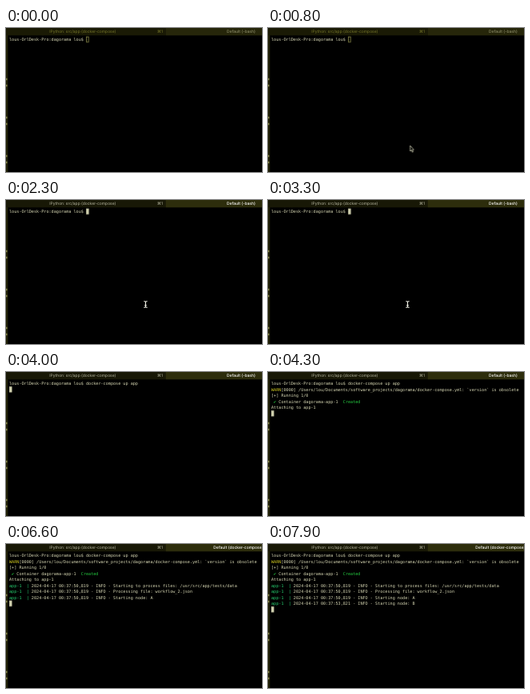
Animation of 320x180 px, one loop 8000 ms. Source, as an HTML page:

```html
<!DOCTYPE html>
<html lang="en">
<head>
<meta charset="utf-8">
<title>Terminal session</title>
<style>
  html, body { margin: 0; width: 100%; height: 100%; overflow: hidden; background: #000; }
  svg { display: block; width: 100vw; height: 100vh; }
  svg * { animation: 8s step-end infinite; }
  text { white-space: pre; text-rendering: geometricPrecision; }
  .term { font: 5.15px "DejaVu Sans Mono", monospace; fill: #d8d8b4; }
  .bar { font: 4.95px Inter, sans-serif; }
  .warn { fill: #d0c820; }
  .ok { fill: #24cc40; }
  .app { fill: #26cf70; }

  /* window gains focus at 2.3 s */
  .tab-idle { animation-name: tab-idle; }
  .tab-open { animation-name: tab-open; }
  .label-idle { animation-name: label-idle; }
  .label-open { animation-name: label-open; }
  .block { stroke-width: .7; animation-name: block; }
  @keyframes tab-idle { 0% { fill: #1a1a05 } 28.75%, 100% { fill: #181806 } }
  @keyframes tab-open { 0% { fill: #26260a } 28.75%, 100% { fill: #2d2d0c } }
  @keyframes label-idle { 0% { fill: #77772a } 28.75%, 100% { fill: #b8b8a2 } }
  @keyframes label-open { 0% { fill: #8a8a66 } 28.75%, 100% { fill: #fff } }
  @keyframes block { 0% { fill: #000; stroke: #a0a054 } 28.75%, 100% { fill: #d2d2b0; stroke: #d2d2b0 } }

  /* the tab is renamed once the command runs */
  .shell { animation-name: shell; }
  .running { animation-name: running; }
  @keyframes shell { 0% { opacity: 1 } 62.5%, 100% { opacity: 0 } }
  @keyframes running { 0% { opacity: 0 } 62.5%, 100% { opacity: 1 } }

  /* mouse pointer */
  .arrow { animation-name: arrow; }
  .beam { animation-name: beam; }
  @keyframes arrow {
    0%, 6.25% { transform: translate(184px, 182px); animation-timing-function: ease-out }
    14%, 28.7% { transform: translate(174.5px, 129.6px); opacity: 1 }
    28.75%, 100% { transform: translate(174.5px, 129.6px); opacity: 0 }
  }
  @keyframes beam { 0% { opacity: 0 } 28.75% { opacity: 1 } 43.25%, 100% { opacity: 0 } }

  /* typing, then the cursor drops below each new line */
  .cursor { animation-name: cursor; }
  @keyframes cursor {
    0% { transform: translate(100.1px, 10.7px) }
    43.25% { transform: translate(100.1px, 10.7px); animation-timing-function: steps(21) }
    49.8% { transform: translate(165.2px, 10.7px) }
    50% { transform: translate(4px, 18.2px) }
    51.2% { transform: translate(4px, 25.7px) }
    52.4% { transform: translate(4px, 40.7px) }
    53.6% { transform: translate(4px, 48.2px) }
    57.4% { transform: translate(4px, 70.7px) }
    94.9%, 100% { transform: translate(4px, 78.2px) }
  }
  .warning { animation-name: warning; }
  .status { animation-name: status; }
  .attach { animation-name: attach; }
  .log { animation-name: log; }
  .node { animation-name: node; }
  @keyframes warning { 0% { opacity: 0 } 51.2%, 100% { opacity: 1 } }
  @keyframes status { 0% { opacity: 0 } 52.4%, 100% { opacity: 1 } }
  @keyframes attach { 0% { opacity: 0 } 53.6%, 100% { opacity: 1 } }
  @keyframes log { 0% { opacity: 0 } 57.4%, 100% { opacity: 1 } }
  @keyframes node { 0% { opacity: 0 } 94.9%, 100% { opacity: 1 } }
</style>
</head>
<body>
<svg viewBox="0 0 320 180">
  <rect width="320" height="180"/>

  <!-- window behind, showing at the left edge -->
  <rect width="2.4" height="180" fill="#222208"/>
  <path d="M0 64h1.5M0 72h1.5M0 112h1.5M0 120h1.5M0 160h1.5M0 168h1.5" stroke="#85854a" stroke-width="2.4"/>

  <g class="bar">
    <rect class="tab-idle" width="199.5" height="9.3"/>
    <rect class="tab-open" x="199.5" width="120.5" height="9.3"/>
    <text class="label-idle" x="54.3" y="6.1">IPython: src/app (docker-compose)</text>
    <text class="label-idle" x="189" y="6.1">⌘1</text>
    <g font-weight="500">
      <g class="shell"><text class="label-open" x="276" y="6.1">Default (-bash)</text></g>
      <g class="running"><text class="label-open" x="259.3" y="6.1">Default (docker-compose)</text></g>
    </g>
  </g>

  <g class="term">
    <text x="4" y="16">lous-OrlDesk-Pro:dagorama lou$ docker-compose up app</text>
    <text class="warning" x="4" y="23.5"><tspan class="warn">WARN</tspan>[0000] /Users/lou/Documents/software_projects/dagorama/docker-compose.yml: `version` is obsolete</text>
    <g class="status">
      <text x="4" y="31">[+] Running 1/0</text>
      <text x="4" y="38.5"> <tspan class="ok">✔</tspan> Container dagorama-app-1  <tspan class="ok">Created</tspan></text>
    </g>
    <text class="attach" x="4" y="46">Attaching to app-1</text>
    <g class="log">
      <text x="4" y="53.5"><tspan class="app">app-1  |</tspan> 2024-04-17 00:37:50,819 - INFO - Starting to process files: /usr/src/app/tests/data</text>
      <text x="4" y="61"><tspan class="app">app-1  |</tspan> 2024-04-17 00:37:50,819 - INFO - Processing file: workflow_2.json</text>
      <text x="4" y="68.5"><tspan class="app">app-1  |</tspan> 2024-04-17 00:37:50,819 - INFO - Starting node: A</text>
    </g>
    <text class="node" x="4" y="76"><tspan class="app">app-1  |</tspan> 2024-04-17 00:37:53,821 - INFO - Starting node: B</text>
  </g>

  <!-- the cursor carries a cover that hides what is not typed yet -->
  <g class="cursor">
    <rect x="-.1" width="75" height="7.2"/>
    <rect class="block" x=".4" y=".2" width="2.7" height="6.7"/>
  </g>

  <path class="arrow" d="M0 0V7L1.5 5.6 2.6 8.2 3.8 7.7 2.7 5.2H4.5Z" stroke="#e2e2c4" stroke-width=".7"/>
  <path class="beam" d="M172.4 126.5Q174.5 126.5 174.5 128V133Q174.5 134.4 172.4 134.4M176.6 126.5Q174.5 126.5 174.5 128M174.5 133Q174.5 134.4 176.6 134.4M173.3 131.6h2.4" fill="none" stroke="#f0f0e4" stroke-width="1.1"/>
</svg>
</body>
</html>
```
